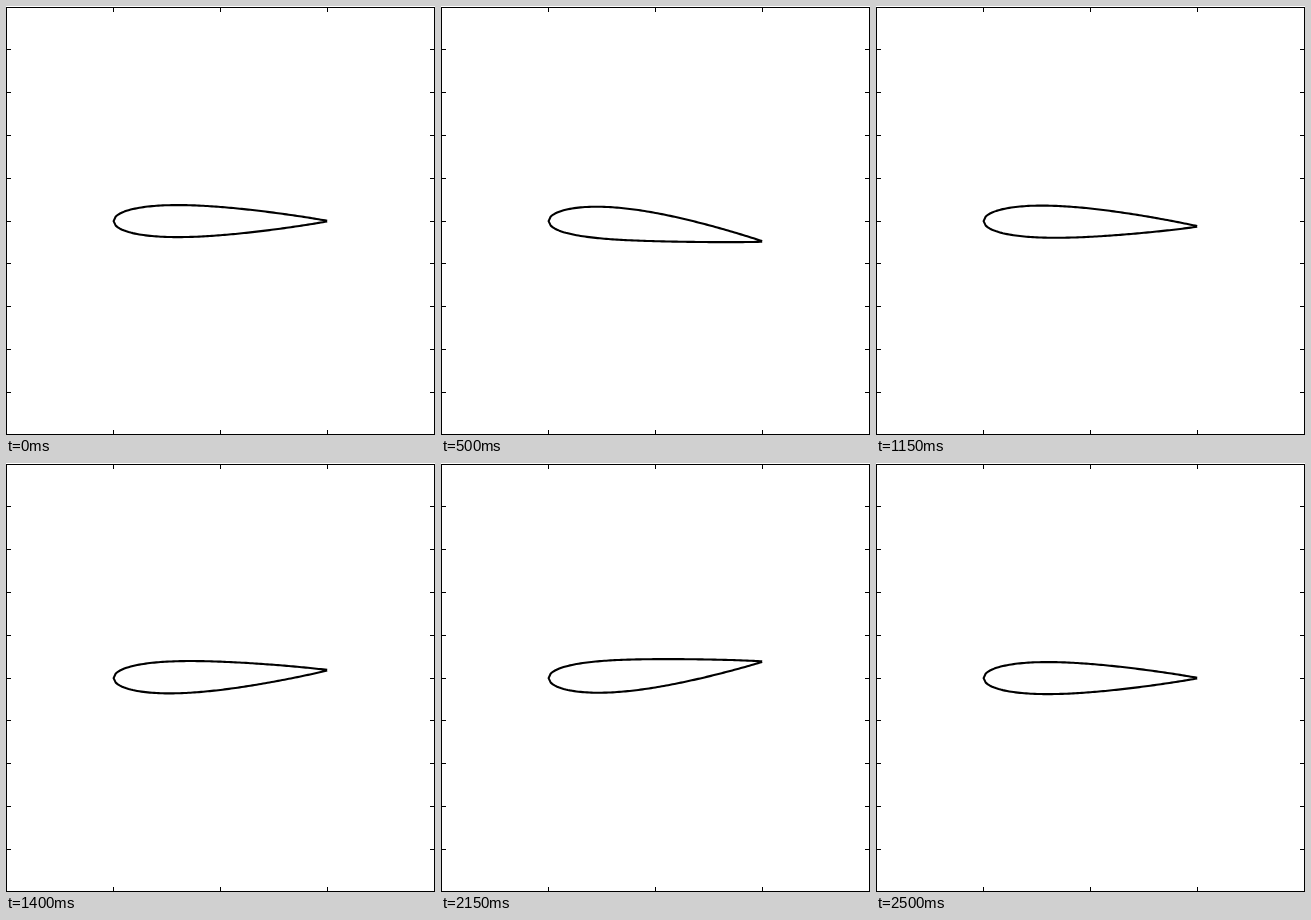
An HTML page with a canvas for the animation above (2550 ms loop, 429 px wide and 429 px high).

```html
<!DOCTYPE html>
<html lang="en">
<head>
<meta charset="utf-8">
<title>Flapping airfoil</title>
<style>
  html, body { margin: 0; width: 100%; height: 100%; overflow: hidden; background: #fff; }
  canvas { display: block; }
</style>
</head>
<body>
<canvas id="stage" width="429" height="429"></canvas>
<script>
const ctx = document.getElementById('stage').getContext('2d');
const SIZE = 429, STEP = 50, LOOP = 2550, PERIOD = 2500;
const NOSE_X = 107.6, NOSE_Y = 215.1, CHORD = 213.6;
const THICKNESS = 0.15, AMPLITUDE = 0.1, SEGMENTS = 100;

// Four-digit NACA half thickness for a chord position from 0 to 1
const halfThickness = x => 5 * THICKNESS *
  (0.2969 * Math.sqrt(x) - 0.126 * x - 0.3516 * x ** 2 + 0.2843 * x ** 3 - 0.1015 * x ** 4);

const bend = x => 1 - Math.cos(Math.PI * x / 2);

function drawAxes() {
  const last = SIZE - 1, tick = 4;
  ctx.fillStyle = '#000';
  ctx.fillRect(0, 1, SIZE, 1);
  ctx.fillRect(0, last, SIZE, 1);
  ctx.fillRect(0, 1, 1, last);
  ctx.fillRect(last, 1, 1, last);
  for (let i = 1; i < 10; i++) {
    const y = Math.floor(1 + 42.8 * i);
    ctx.fillRect(0, y, tick + 1, 1);
    ctx.fillRect(last - tick, y, tick + 1, 1);
  }
  for (let i = 1; i < 4; i++) {
    ctx.fillRect(107 * i, 1, 1, tick + 1);
    ctx.fillRect(107 * i, last - tick, 1, tick + 1);
  }
}

function drawFoil(deflection) {
  const lineTo = (i, side) => {
    const x = i / SEGMENTS;
    const y = deflection * bend(x) + side * halfThickness(x);
    ctx.lineTo(NOSE_X + CHORD * x, NOSE_Y + CHORD * y);
  };
  ctx.beginPath();
  for (let i = SEGMENTS; i >= 0; i--) lineTo(i, -1);
  for (let i = 1; i <= SEGMENTS; i++) lineTo(i, 1);
  ctx.strokeStyle = '#000';
  ctx.lineWidth = 2.1;
  ctx.lineJoin = 'round';
  ctx.stroke();
}

function draw(time) {
  const t = Math.floor((time % LOOP) / STEP) * STEP;
  ctx.fillStyle = '#fff';
  ctx.fillRect(0, 0, SIZE, SIZE);
  drawAxes();
  drawFoil(AMPLITUDE * Math.sin(2 * Math.PI * t / PERIOD));
}

let start;
function tick(now) {
  start ??= now;
  draw(now - start);
  requestAnimationFrame(tick);
}
draw(0);
requestAnimationFrame(tick);
</script>
</body>
</html>
```
